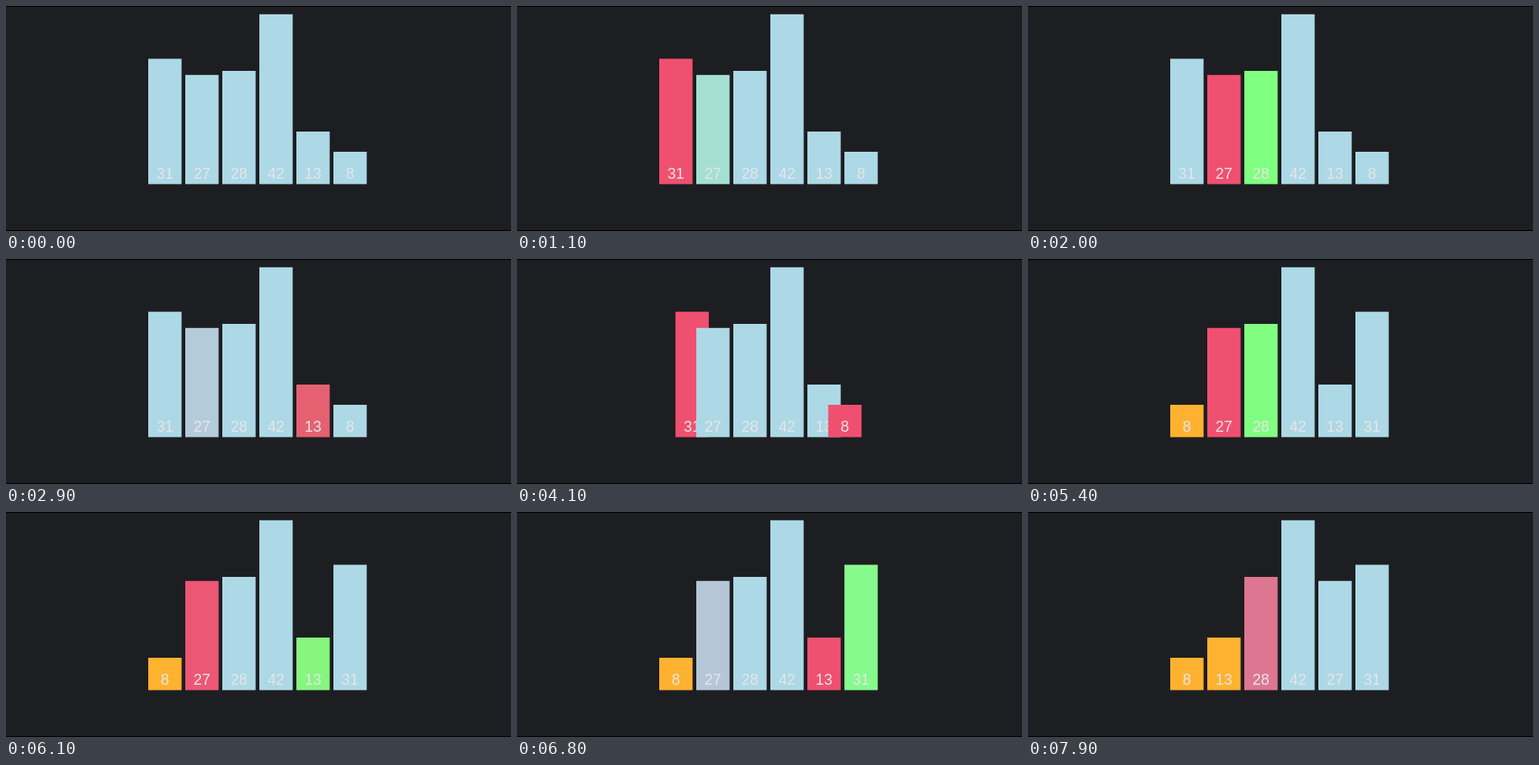
Animation, 600 px wide and 267 px high, one loop 8000 ms. Source, as an HTML page with a canvas:

```html
<!DOCTYPE html>
<html lang="en">
<head>
<meta charset="utf-8">
<title>Selection sort</title>
<style>
html, body { margin: 0; width: 100%; height: 100%; overflow: hidden; background: #1d1e21; }
canvas { display: block; }
</style>
</head>
<body>
<canvas id="stage" width="600" height="267"></canvas>
<script>
const ctx = document.getElementById('stage').getContext('2d');
const LOOP = 8000, TICK = 100, STEP = 336, START = 646;
const LEFT = 169, PITCH = 44, WIDTH = 39.6, BASE = 211.4, UNIT = 4.8;
const values = [31, 27, 28, 42, 13, 8];
const COLOR = {
  idle: [173, 216, 230],
  min: [240, 80, 112],
  check: [128, 255, 128],
  done: [255, 178, 48]
};

// Run the sort and record the state of every bar after each step.
function record() {
  let state = values.map((v, i) => ({ slot: i, color: 'idle' }));
  const order = values.map((v, i) => i);
  const states = [state];
  const push = (marks) => {
    state = state.map((bar, i) => ({
      slot: order.indexOf(i),
      color: marks[i] || (bar.color === 'done' ? 'done' : 'idle')
    }));
    states.push(state);
  };
  for (let i = 0; i < order.length - 1; i++) {
    let min = i;
    push({ [order[i]]: 'min' });
    for (let j = i + 1; j < order.length; j++) {
      push({ [order[min]]: 'min', [order[j]]: 'check' });
      if (values[order[j]] < values[order[min]]) {
        min = j;
        push({ [order[min]]: 'min' });
      }
    }
    if (min !== i) {
      const pair = { [order[i]]: 'min', [order[min]]: 'min' };
      push(pair);
      [order[i], order[min]] = [order[min], order[i]];
      push(pair);
    }
    push({ [order[i]]: 'done' });
  }
  return states;
}

const states = record();
const ease = u => u < 0.5 ? 4 * u ** 3 : 1 - 4 * (1 - u) ** 3;
const mix = (a, b, k) => a + (b - a) * k;

function draw(t) {
  const pos = Math.max(0, (t - START) / STEP);
  const n = Math.min(Math.floor(pos), states.length - 2);
  const k = ease(Math.min(1, pos - n));

  ctx.fillStyle = '#1d1e21';
  ctx.fillRect(0, 0, 600, 267);
  ctx.fillStyle = '#000';
  ctx.fillRect(0, 0, 600, 1);
  ctx.fillRect(0, 266, 600, 1);

  ctx.font = '18px "Liberation Sans", Arial, sans-serif';
  ctx.textAlign = 'center';
  values.forEach((value, i) => {
    const from = states[n][i], to = states[n + 1][i];
    const x = LEFT + PITCH * mix(from.slot, to.slot, k);
    const rgb = COLOR[from.color].map((c, j) => Math.round(mix(c, COLOR[to.color][j], k)));
    ctx.fillStyle = `rgb(${rgb})`;
    ctx.fillRect(x, BASE - value * UNIT, WIDTH, value * UNIT);
    ctx.fillStyle = '#e6e6e8';
    ctx.fillText(value, x + WIDTH / 2, 204.5);
  });
}

let origin = null;
function frame(now) {
  if (origin === null) origin = now;
  const t = (now - origin) % LOOP;
  draw(Math.floor(t / TICK) * TICK);
  requestAnimationFrame(frame);
}
draw(0);
requestAnimationFrame(frame);
</script>
</body>
</html>
```
